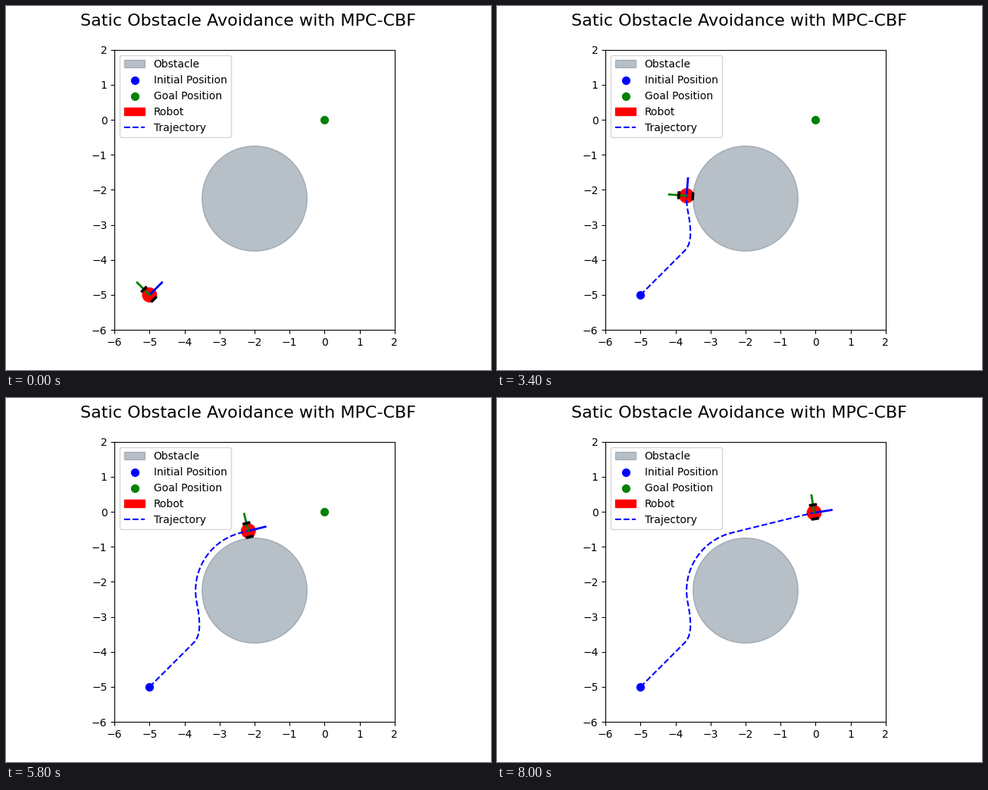
Write a matplotlib script that moves like this. It is 640 by 480 pixels and loops after 8100 ms.

```python
import numpy as np
import matplotlib.pyplot as plt
from matplotlib.animation import FuncAnimation
from matplotlib.patches import Circle, Rectangle

FRAMES = 81
STEP = 0.1          # distance covered per frame
ROBOT_RADIUS = 0.2
ORBIT_RADIUS = 1.7
AXIS_LENGTH = 0.5
WHEEL = (0.2, 0.05)
START, GOAL = (-5, -5), (0, 0)
OBSTACLE, OBSTACLE_RADIUS = (-2, -2.25), 1.5


def heading(k):
    """Swerve off the diagonal, orbit the obstacle, then run to the goal."""
    swerve = 45 + 58 * (1 - np.exp(-np.maximum(k - 17.5, 0) / 3.6))
    orbit = 90 - np.degrees(STEP / ORBIT_RADIUS) * (k - 32.7)
    home = 13.8 - 5 * np.exp(k - (FRAMES - 1))
    return np.radians(np.maximum(home, np.minimum(swerve, orbit)))


theta = heading(np.arange(FRAMES))
forward = np.column_stack([np.cos(theta), np.sin(theta)])
left = np.column_stack([-np.sin(theta), np.cos(theta)])
path = np.vstack([START, START + np.cumsum(STEP * forward[:-1], axis=0)])

fig, ax = plt.subplots(figsize=(6.4, 4.8), dpi=100)
fig.suptitle("Satic Obstacle Avoidance with MPC-CBF", fontsize=16)
ax.set_aspect("equal")
ax.set_xlim(-6, 2)
ax.set_ylim(-6, 2)

ax.add_patch(Circle(OBSTACLE, OBSTACLE_RADIUS, color="slategray", alpha=0.5,
                    label="Obstacle"))
ax.scatter(*START, s=50, color="blue", label="Initial Position")
ax.scatter(*GOAL, s=50, color="green", label="Goal Position")
robot = ax.add_patch(Circle(START, ROBOT_RADIUS, color="red", label="Robot"))
wheels = [ax.add_patch(Rectangle(START, *WHEEL, color="black", zorder=3))
          for _ in range(2)]
trajectory, = ax.plot([], [], "b--", label="Trajectory")
x_axis, = ax.plot([], [], color="blue", lw=2)
y_axis, = ax.plot([], [], color="green", lw=2)
# The legend moves aside whenever the robot reaches its corner.
ax.legend(loc="best")


def draw(k):
    pos = path[k]
    robot.center = pos
    for wheel, side in zip(wheels, (1, -1)):
        wheel.set_xy(pos - WHEEL[0] / 2 * forward[k]
                     + side * ROBOT_RADIUS * left[k])
        wheel.set_angle(np.degrees(theta[k]))
    for line, direction in ((x_axis, forward[k]), (y_axis, left[k])):
        line.set_data(*np.transpose([pos, pos + AXIS_LENGTH * direction]))
    trajectory.set_data(*path[:k + 1].T)
    return [robot, *wheels, trajectory, x_axis, y_axis]


anim = FuncAnimation(fig, draw, frames=FRAMES, interval=100, repeat=True,
                     repeat_delay=0, blit=False)
plt.show()
```
